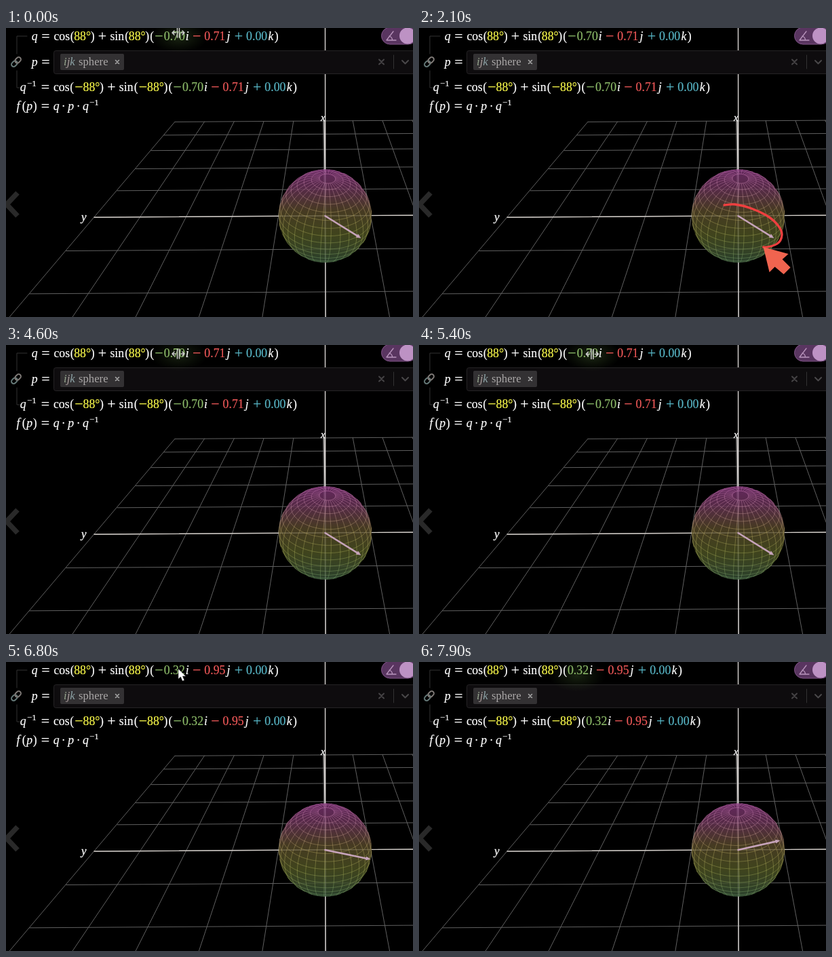
An HTML page for the animation above (8000 ms loop, 600 px wide and 426 px high).

```html
<!DOCTYPE html>
<html lang="en">
<head>
<meta charset="utf-8">
<title>Quaternion rotation</title>
<style>
html, body { margin: 0; width: 100%; height: 100%; overflow: hidden; background: #000; }
svg { display: block; width: 100%; height: 100%; }
text { font-family: "Liberation Serif", serif; font-size: 17.8px; fill: #fff; }
.math text { text-anchor: middle; stroke-width: .2px; }
path, line { fill: none; stroke-linecap: round; stroke-linejoin: round; }
.it { font-style: italic; }
</style>
</head>
<body>
<svg viewBox="0 0 600 426">
  <defs>
    <linearGradient id="skin" gradientUnits="userSpaceOnUse" x1="0" y1="208" x2="0" y2="346">
      <stop offset="0" stop-color="#7c3274"/><stop offset=".2" stop-color="#6c345a"/>
      <stop offset=".45" stop-color="#57492a"/><stop offset=".7" stop-color="#505524"/>
      <stop offset="1" stop-color="#344f36"/>
    </linearGradient>
    <linearGradient id="mesh" gradientUnits="userSpaceOnUse" x1="0" y1="208" x2="0" y2="346">
      <stop offset="0" stop-color="#c46bb4"/><stop offset=".25" stop-color="#c08a9c"/>
      <stop offset=".5" stop-color="#b3a25c"/><stop offset=".75" stop-color="#9ea652"/>
      <stop offset="1" stop-color="#6f9a68"/>
    </linearGradient>
    <radialGradient id="green"><stop stop-color="#6d9a4c" stop-opacity=".5"/><stop offset="1" stop-color="#4d7030" stop-opacity="0"/></radialGradient>
  </defs>

  <path id="grid" stroke="#606060"/>
  <path d="M130 279L600 276" stroke="#cfcac5" stroke-width="1.4"/>
  <path d="M470.5 0L471 426M469 137L471 277" stroke="#d8d4d2" stroke-width="1.4"/>
  <circle cx="470.5" cy="277" r="68.500" fill="url(#skin)" fill-opacity=".8"/>
  <path id="sphere" stroke="url(#mesh)" stroke-width=".8" opacity=".55"/>
  <g id="axis">
    <line stroke="#c6a3ba" stroke-width="2.6"/>
    <path style="fill:#c6a3ba"/>
  </g>
  <text class="it" x="464" y="137" style="font-size:15px" stroke="#fff" stroke-width=".3">x</text>
  <text class="it" x="111" y="284" style="font-size:17px" stroke="#fff" stroke-width=".3">y</text>

  <path d="M17 243L1 260L17 277" stroke="#292929" stroke-width="7.500" style="stroke-linecap:butt;stroke-linejoin:miter"/>

  <path d="M31 12H16V38M16 63V88H21" stroke="#333"/>
  <g transform="translate(15 50) rotate(-45)" fill="none" stroke-width="1.900">
    <rect x="-8.500" y="-3.300" width="9.500" height="6.600" rx="3.300" stroke="#667a79"/>
    <rect x="-1" y="-3.300" width="9.500" height="6.600" rx="3.300" stroke="#807b78"/>
  </g>
  <rect x="70.500" y="33.500" width="540" height="34" rx="3" fill="#0e0c0e" stroke="#252325"/>
  <rect x="80" y="38" width="94" height="24" rx="2" fill="#333133"/>
  <text x="85" y="55" style="font-size:16.700px;fill:#aaa7a7"><tspan class="it" fill="#97a58f">i</tspan><tspan class="it" fill="#aa9d9c">j</tspan><tspan class="it" fill="#8fa5a8">k</tspan><tspan x="107">sphere</tspan></text>
  <path d="M161.500 47.500l5 5m0-5l-5 5" stroke="#aaa" stroke-width="1.500"/>
  <path d="M550 46.500l7 7m0-7l-7 7" stroke="#454345" stroke-width="2"/>
  <path d="M571.500 40V60" stroke="#333"/>
  <path d="M584 48l4.500 4.500 4.500-4.500" stroke="#4a484a" stroke-width="2"/>

  <rect x="553.500" y="-1" width="52" height="25" rx="12.500" fill="#593560" stroke="#82568a"/>
  <circle cx="592" cy="11.500" r="12" fill="#bd92c4"/>
  <path d="M571 5L561 18H575M565 12Q569.500 13.500 569.500 18" stroke="#b995bd" stroke-width="1.300"/>

  <ellipse id="glow" rx="42" ry="24" fill="url(#green)"/>
  <g class="math">
    <g id="rowQ"></g><g id="rowP"></g><g id="rowInv"></g><g id="rowF"></g>
  </g>

  <path id="loop" pathLength="1" stroke="#ee3f3f" stroke-width="3.300" stroke-dasharray="1 2"/>
  <path id="marker" d="M0 0L37 10L28 18L40 30L30 40L17 29L9 37Z" style="fill:#f0644f"/>
  <path id="resize" d="M-1.500-7V7M1.500-7V7M-4 0H-9M-6-3L-9 0L-6 3M4 0H9M6-3L9 0L6 3" stroke="#ccc" stroke-width="1.500"/>
  <path id="pointer" d="M0 0V15L3.500 12L6 18L9 17L6.500 11H11Z" stroke="#222" stroke-width=".6" style="fill:#fff"/>
</svg>
<script>
const DURATION = 8000, EM = 17.8, RAD = Math.PI / 180;
const CENTER = { x: 470.5, y: 277 }, RADIUS = 68.5;
const TILT = { s: .62, c: .785 };
const $ = id => document.getElementById(id);
const show = (el, on) => { el.style.display = on ? "" : "none"; };
const place = (el, [x, y]) => el.setAttribute("transform", `translate(${x} ${y})`);

// Linear interpolation through [time, value, value...] keys.
function track(t, keys) {
  if (t <= keys[0][0]) return keys[0].slice(1);
  const n = keys.findIndex(k => k[0] > t);
  if (n < 0) return keys[keys.length - 1].slice(1);
  const a = keys[n - 1], b = keys[n], f = (t - a[0]) / (b[0] - a[0]);
  return a.slice(1).map((v, i) => v + (b[i + 1] - v) * f);
}

// Ground plane: x runs away from the viewer, y runs to the left.
function ground(x, y) {
  const w = 1 + .111 * x;
  return [470.5 - .6 * x - 68 * y / w, (277 - 12.8 * x + .45 * y) / w];
}

function drawGrid() {
  let d = "";
  for (let n = -3; n <= 5; n++) {
    d += `M${ground(n, 5)}L${ground(n, -8)}`;
    d += `M${ground(5, n)}L${ground(-3, n)}`;
  }
  for (let n = -8; n < -3; n++) d += `M${ground(5, n)}L${ground(-3, n)}`;
  $("grid").setAttribute("d", d);
}

// Advance widths in em; operators include the space around them.
const ADVANCE = { q: .482, p: .503, f: .6, i: .345, j: .469, k: .55, cos: 1.338, sin: 1.228,
  "(": .389, ")": .389, "=": 1.334, "+": 1.222, "−": 1.222, "·": .722, "-": .778, "88°": 1.3, "^-1": .93 };
const COLORS = { y: "#f7f74a", g: "#8cba69", r: "#ee5858", t: "#58b6c6", w: "#fff" };

// Tokens are split by spaces; a suffix such as ":y" picks the colour.
function setRow(id, x, y, source) {
  const row = $(id);
  if (row.dataset.source === source) return;
  row.dataset.source = source;
  row.innerHTML = "<text>" + source.split(" ").map(token => {
    const [word, color = "w"] = token.split(":");
    const advance = (ADVANCE[word] || 1.778) * EM, mid = x + advance / 2;
    x += advance;
    const operator = "+−-=".includes(word), power = word === "^-1";
    const size = operator ? 22 : power ? 12.8 : EM;
    const base = y + (operator ? 1 : power ? -7 : 0);
    const label = power ? "−1" : word === "-" ? "−" : word;
    const italic = /^[fijkpq]$/.test(word) ? ' class="it"' : "";
    return `<tspan${italic} x="${mid}" y="${base}" fill="${COLORS[color]}" stroke="${COLORS[color]}" style="font-size:${size}px">${label}</tspan>`;
  }).join("") + "</text>";
}

function drawFormulas(i, j) {
  const sign = i < 0 ? "-:g " : "";
  const vector = `( ${sign}${Math.abs(i).toFixed(2)}:g i −:r ${Math.abs(j).toFixed(2)}:r j +:t 0.00:t k )`;
  setRow("rowQ", 38, 18, `q = cos ( 88°:y ) + sin ( 88°:y ) ${vector}`);
  setRow("rowP", 37.6, 55.5, "p =");
  setRow("rowInv", 21, 93, `q ^-1 = cos ( -:y 88°:y ) + sin ( -:y 88°:y ) ${vector}`);
  setRow("rowF", 12.6, 121, "f ( p ) = q · p · q ^-1");
}

// Rotate v about the horizontal unit axis (i, j, 0).
function rotate([x, y, z], i, j, angle) {
  const c = Math.cos(angle), s = Math.sin(angle), k = (i * x + j * y) * (1 - c);
  return [x * c + j * z * s + i * k, y * c - i * z * s + j * k, z * c + (i * y - j * x) * s];
}

function drawSphere(i, j) {
  let d = "", pen = false;
  const visit = (lat, lon) => {
    const r = Math.cos(lat * RAD);
    const v = [r * Math.cos(lon * RAD), r * Math.sin(lon * RAD), Math.sin(lat * RAD)];
    const [x, y, z] = rotate(v, i, j, 176 * RAD);
    if (z * TILT.s - x * TILT.c < 0) { pen = false; return; }
    const px = CENTER.x - RADIUS * y, py = CENTER.y - RADIUS * (x * TILT.s + z * TILT.c);
    d += (pen ? "L" : "M") + px.toFixed(1) + " " + py.toFixed(1);
    pen = true;
  };
  for (let lat = -80; lat <= 80; lat += 10, pen = false)
    for (let lon = 0; lon <= 360; lon += 5) visit(lat, lon);
  for (let lon = 0; lon < 360; lon += 12, pen = false)
    for (let lat = -80; lat <= 80; lat += 5) visit(lat, lon);
  $("sphere").setAttribute("d", d);
}

function drawAxis(i, j) {
  const [x, y] = ground(i, j), [line, head] = $("axis").children;
  const dx = x - CENTER.x, dy = y - CENTER.y, len = Math.hypot(dx, dy);
  const ux = dx / len, uy = dy / len, bx = x - ux * 7, by = y - uy * 7;
  const ends = { x1: CENTER.x, y1: CENTER.y, x2: bx, y2: by };
  for (const key in ends) line.setAttribute(key, ends[key]);
  head.setAttribute("d", `M${x} ${y}L${bx - uy * 3} ${by + ux * 3}L${bx + uy * 3} ${by - ux * 3}Z`);
}

function smoothPath(p) {
  let d = `M${p[0]}`;
  for (let n = 0; n < p.length - 1; n++) {
    const a = p[n - 1] || p[n], b = p[n], c = p[n + 1], e = p[n + 2] || c;
    d += `C${b[0] + (c[0] - a[0]) / 6} ${b[1] + (c[1] - a[1]) / 6} ${c[0] - (e[0] - b[0]) / 6} ${c[1] - (e[1] - b[1]) / 6} ${c}`;
  }
  return d;
}

drawGrid();
const loop = $("loop");
loop.setAttribute("d", smoothPath([[450, 261], [466, 260], [490, 266], [515, 278], [530, 292], [535, 305],
  [528, 318], [508, 323], [487, 316], [468, 302], [457, 286], [451, 270], [453, 259], [461, 256], [478, 261]]));
const loopLength = loop.getTotalLength();
let lastAngle;

function drawMarker(t) {
  const [drawn] = track(t, [[1400, 0], [2100, .537], [2800, 1]]);
  loop.setAttribute("stroke-dashoffset", 1 - drawn);
  loop.style.opacity = track(t, [[3700, 1], [4000, 0]])[0];
  show(loop, t > 1400 && t < 4000);
  show($("marker"), t >= 600 && t < 4000);
  const tip = loop.getPointAtLength(drawn * loopLength);
  place($("marker"), t < 1400 ? track(t, [[600, 254, 13], [1300, 450, 261]])
    : t < 2800 ? [tip.x, tip.y]
    : track(t, [[2800, 478, 261], [3100, 553, 208], [3300, 547, 207], [3600, 547, 207], [4000, 254, 13]]));
}

function drawCursor(t) {
  show($("resize"), t < 600 || t >= 4000 && t < 6600);
  place($("resize"), track(t, [[0, 254, 7], [600, 254, 13], [5200, 254, 13], [6200, 261, 15]]));
  show($("pointer"), t >= 6600 && t < 7600);
  place($("pointer"), [254, 10]);
  place($("glow"), track(t, [[0, 255, 13], [6300, 255, 15], [7900, 233, 20]]));
  $("glow").style.opacity = track(t, [[0, .5], [500, .5], [700, 0], [4000, 0], [4300, .4], [6000, .65],
    [6500, .65], [6700, 0], [7500, 0], [7700, .45]])[0];
}

function render(t) {
  const [angle] = track(t, [[6200, -44.6], [6300, -42.2], [7300, 5.2], [7900, 18.7]]);
  if (angle !== lastAngle) {
    lastAngle = angle;
    const i = Math.sin(angle * RAD), j = -Math.cos(angle * RAD);
    drawFormulas(i, j);
    drawSphere(i, j);
    drawAxis(i, j);
  }
  drawMarker(t);
  drawCursor(t);
}

const start = performance.now();
function frame() {
  render((performance.now() - start) % DURATION);
  requestAnimationFrame(frame);
}
frame();
</script>
</body>
</html>
```
